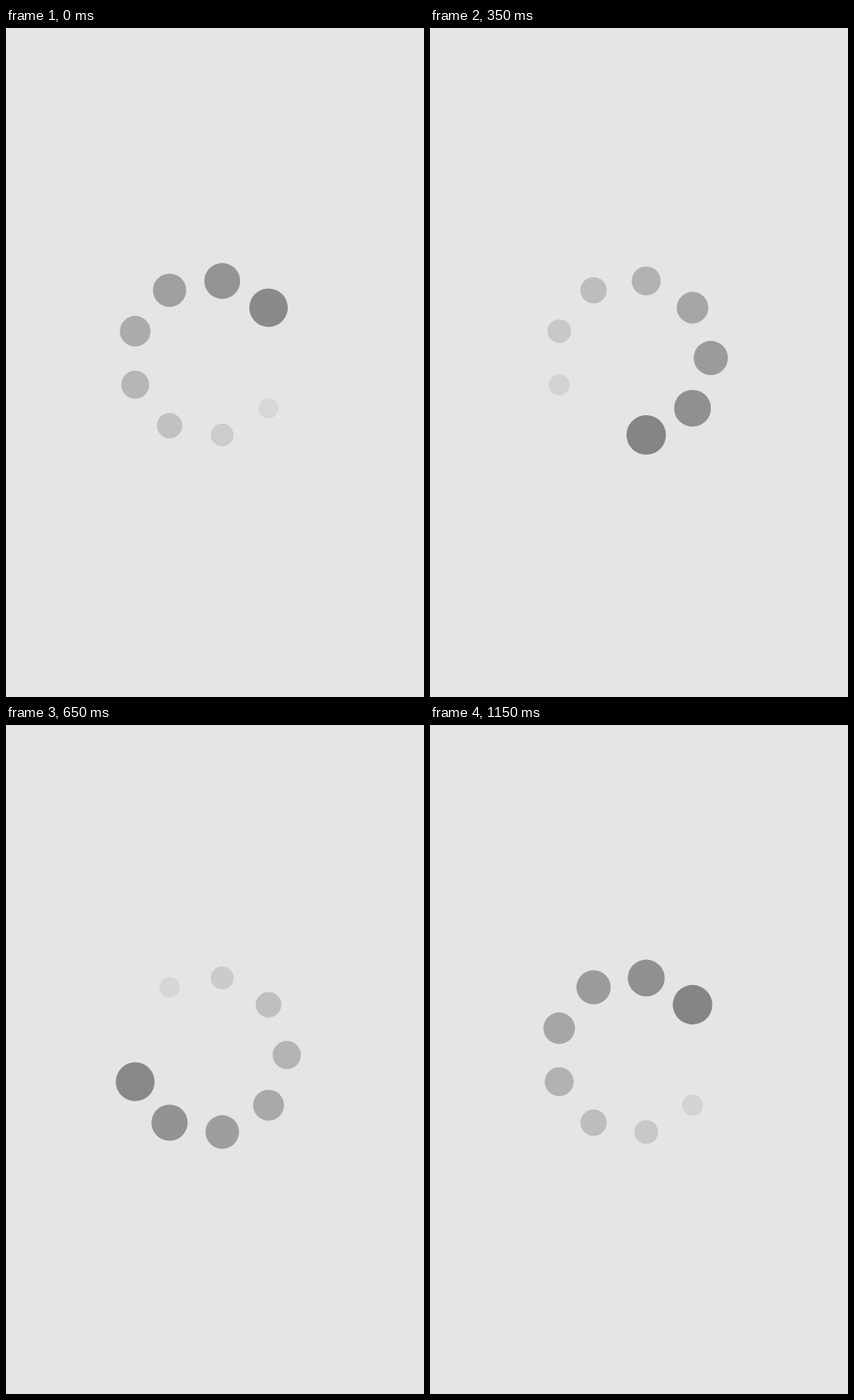
Write an HTML page with a canvas that moves like this. It is 500 px wide and 800 px high and loops after 1.2 s.

```html
<!DOCTYPE html>
<html>
<head>
<meta charset="utf-8">
<style>
  html, body { margin: 0; height: 100%; overflow: hidden; background: #e5e5e5; }
  canvas { display: block; }
</style>
</head>
<body>
<canvas id="stage" width="500" height="800"></canvas>
<script>
const ctx = document.getElementById('stage').getContext('2d');
const LOOP = 1200, STEP = 50, DELAY = 10, DOTS = 9;
const CX = 242.4, CY = 394.6, RING = 93.5;
const VISIBLE = 0.94; // part of the loop before a dot vanishes

// Each dot pops up large and dark, then shrinks and fades; age runs from 0 to 1.
function drawDot(i, time) {
  const age = (time - DELAY - i * LOOP / DOTS + LOOP) % LOOP / LOOP;
  if (age > VISIBLE) return;
  const angle = i / DOTS * 2 * Math.PI;
  const radius = 24.5 - 14.2 * age;
  const grey = Math.round(127 + 100 * age);
  ctx.fillStyle = `rgb(${grey}, ${grey}, ${grey})`;
  ctx.beginPath();
  ctx.arc(CX + RING * Math.cos(angle), CY + RING * Math.sin(angle), radius, 0, 2 * Math.PI);
  ctx.fill();
}

function draw(now) {
  const time = Math.floor(now % LOOP / STEP) * STEP;
  ctx.clearRect(0, 0, 500, 800);
  for (let i = 0; i < DOTS; i++) drawDot(i, time);
  requestAnimationFrame(draw);
}
requestAnimationFrame(draw);
</script>
</body>
</html>
```
